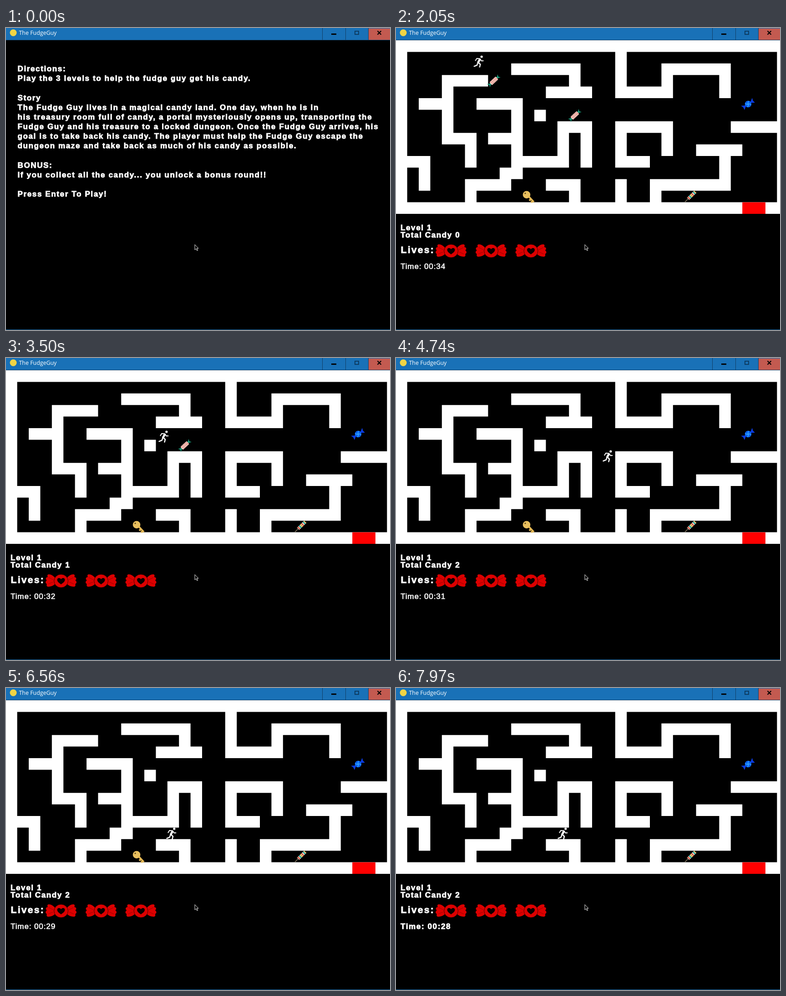
An HTML page for the animation above (8000 ms loop, 844 px wide and 663 px high).

```html
<!DOCTYPE html>
<html lang="en">
<head>
<meta charset="utf-8">
<title>The FudgeGuy</title>
<style>
html, body { margin: 0; width: 100%; height: 100%; overflow: hidden; background: #000; }
svg { display: block; width: 844px; height: 663px; }
text { fill: #fff; white-space: pre; }
.bold { font: bold 17px "Liberation Sans", Arial, sans-serif; letter-spacing: 1.63px; stroke: #fff; stroke-width: .9px; }
.big { font-size: 21px; letter-spacing: 2.3px; }
.thin { font: 17px "Liberation Sans", Arial, sans-serif; letter-spacing: .9px; stroke: #fff; stroke-width: .65px; }
.title { font: 12.4px "Open Sans", "Noto Sans", sans-serif; }

.tick, .intro, .sweet1, .sweet2, .key, .n0, .n1, .n2 { animation: 8s step-end infinite; }
.tick { animation-name: tick; animation-delay: calc(var(--i) * 1s - 7650ms); }
.intro { animation-name: intro; }
.sweet1, .n0 { animation-name: first; }
.sweet2 { animation-name: second; }
.n1 { animation-name: one; }
.n2 { animation-name: two; }
.key { animation-name: key; }
@keyframes tick { 0% { visibility: visible } 12.5%, 100% { visibility: hidden } }
@keyframes intro { 0% { visibility: visible } 6.25%, 100% { visibility: hidden } }
@keyframes first { 0% { visibility: visible } 28.875%, 100% { visibility: hidden } }
@keyframes second { 0% { visibility: visible } 45.625%, 100% { visibility: hidden } }
@keyframes one { 0%, 45.625%, 100% { visibility: hidden } 28.875% { visibility: visible } }
@keyframes two { 0% { visibility: hidden } 45.625%, 100% { visibility: visible } }
@keyframes key { 0% { visibility: visible } 89.375%, 100% { visibility: hidden } }

.runner { animation: run 8s linear infinite; }
@keyframes run {
  0% { transform: translate(34px, 60px) }
  12.875% { transform: translate(34px, 60px); animation-timing-function: steps(8) }
  15.875% { transform: translate(67px, 60px); animation-timing-function: steps(19) }
  23% { transform: translate(140px, 60px); animation-timing-function: steps(12) }
  27.5% { transform: translate(192px, 60px); animation-timing-function: steps(15) }
  33.25% { transform: translate(260px, 124px); animation-timing-function: steps(1) }
  33.625% { transform: translate(261px, 128px) }
  35.125% { transform: translate(261px, 128px); animation-timing-function: steps(5) }
  37% { transform: translate(282px, 128px); animation-timing-function: steps(7) }
  39.625% { transform: translate(303px, 154px); animation-timing-function: steps(7) }
  42.25% { transform: translate(331px, 155px) }
  43.25% { transform: translate(331px, 155px); animation-timing-function: steps(1) }
  43.625% { transform: translate(335px, 159px); animation-timing-function: steps(5) }
  45.5% { transform: translate(356px, 178px); animation-timing-function: steps(20) }
  53% { transform: translate(440px, 179px) }
  56.75% { transform: translate(440px, 179px); animation-timing-function: steps(6) }
  59% { transform: translate(454px, 202px); animation-timing-function: steps(2) }
  59.75% { transform: translate(456px, 207px); animation-timing-function: steps(14) }
  65.125% { transform: translate(456px, 264px); animation-timing-function: steps(5) }
  67% { transform: translate(433px, 285px); animation-timing-function: steps(6) }
  69.25% { transform: translate(433px, 310px); animation-timing-function: steps(11) }
  73.375% { transform: translate(382px, 310px); animation-timing-function: steps(3) }
  74.5% { transform: translate(382px, 297px) }
  78% { transform: translate(382px, 297px); animation-timing-function: steps(3) }
  79.125% { transform: translate(382px, 306px); animation-timing-function: steps(7) }
  81.75% { transform: translate(352px, 306px); animation-timing-function: steps(13) }
  86.625% { transform: translate(298px, 306px); animation-timing-function: steps(5) }
  88.375% { transform: translate(290px, 324px); animation-timing-function: steps(3) }
  89.5% { transform: translate(290px, 336px) }
  91.75% { transform: translate(290px, 336px); animation-timing-function: steps(7) }
  94.375% { transform: translate(303px, 306px); animation-timing-function: steps(11) }
  98.5% { transform: translate(343px, 306px); animation-timing-function: steps(3) }
  99.5%, 100% { transform: translate(355px, 306px) }
}
</style>
</head>
<body>
<svg viewBox="0 0 844 663">
  <defs>
    <g id="sweet">
      <path d="M-7 0L-16 -4.5L-13.500 0L-16 4.5ZM7 0L16 -4.5L13.500 0L16 4.5Z" fill="#169c7b"/>
      <rect x="-9.5" y="-4.4" width="19" height="8.8" rx="2" fill="#f6d5cb"/>
      <path d="M-8 -4L-5 4M-4.500 -4L-1.500 4M-1 -4L2 4M2.500 -4L5.500 4M6 -4L8.500 3" stroke="#d9746c" stroke-width="1.2"/>
    </g>
    <g id="life">
      <g id="wing" fill="#dc0000">
        <path d="M-9 -3C-15 -8 -20 -15 -28 -14C-31 -13 -30 -9 -29 -8C-34 -8 -35 -3 -31 -1C-35 1 -35 6 -31 7C-33 10 -31 14 -27 13C-20 13 -15 9 -9 4Z"/>
        <path d="M-27 -7L-17 -2M-28 7L-18 3" fill="none" stroke="#8a0000" stroke-width=".8"/>
      </g>
      <use href="#wing" transform="scale(-1 1)"/>
      <ellipse cy="0.5" rx="15.500" ry="14.5" fill="#dc0000" stroke="#200" stroke-width=".8"/>
      <path d="M0 8C-4 5 -8.500 2 -8.500 -2C-8.500 -7 -2 -7.500 0 -3C2 -7.500 8.500 -7 8.500 -2C8.500 2 4 5 0 8Z" fill="#0a0000"/>
    </g>
  </defs>

  <rect width="844" height="663"/>

  <g transform="translate(11.9 39.7) scale(25.4)">
    <path fill="none" stroke="#fff" stroke-linecap="square" d="M0 0H33V14H0Z
      M19 0V4H23V2H28V4 M10 2H15V4 M13 4H16 M7 3H4V8H6V10 M2 5H4
      M7 5H10V11H9V12H6V13 M8 8H10 M10 10H14V7H16V10 M12 6h.001
      M23 9V7H19V10H21 M29 7H33 M26 9H29 M28 9V12H22V13
      M0 10H2V12 M13 12H15V13 M19 12V13"/>
    <rect x="29.5" y="13.5" width="2" height="1" fill="#f00"/>
  </g>

  <use class="sweet1" href="#sweet" transform="translate(215 116) rotate(-43)"/>
  <use class="sweet2" href="#sweet" transform="translate(393 192) rotate(-43)"/>

  <g transform="translate(774 167) rotate(-35)">
    <path d="M-5 0L-15 -6L-13 0L-14 6ZM5 0L15 -6L13 0L14 6Z" fill="#0b3ce0"/>
    <circle r="7.3" fill="#0a5cf0"/>
    <path d="M0 0Q1 -4 5 -4M0 0Q4 1 4 5M0 0Q-1 4 -5 4M0 0Q-4 -1 -4 -5" fill="none" stroke="#35b6ff" stroke-width="1.5"/>
  </g>

  <g transform="translate(635 382) rotate(-44.5)" fill="none">
    <path d="M0 0H12" stroke="#8d8068" stroke-width="1.5"/>
    <path d="M10 0H32" stroke="#efe6cf" stroke-width="7"/>
    <path d="M11 0h2.500m9 0h2.500" stroke="#d8483d" stroke-width="7"/>
    <path d="M15 0h3m9 0h2.500" stroke="#1c9d92" stroke-width="7"/>
    <path d="M19 0h2.500m9 0h1.500" stroke="#d9a83c" stroke-width="7"/>
  </g>

  <g class="key">
    <path d="M289 367L303 382M296 376l-3 3M300 380l-3 3" stroke="#e3b755" stroke-width="4" fill="none"/>
    <circle cx="287" cy="366" r="8.300" fill="#e8bf5e"/>
    <circle cx="284" cy="363" r="1.500" fill="#4a3510"/>
  </g>

  <g class="runner" fill="none" stroke="#fff" stroke-linecap="round" stroke-linejoin="round">
    <circle cx="17.800" cy="3" r="2.600" fill="#fff" stroke="none"/>
    <path d="M13.800 9L10.300 15.300" stroke-width="4.600"/>
    <path d="M13.800 7.500L7.300 6.800L4.300 11.500M15.200 9L17.700 12.300L21.300 12.100" stroke-width="2"/>
    <path d="M10.800 16L15 19.800L13.500 25.500M9.500 16L7.800 21.500L1.500 24.100" stroke-width="2.500"/>
  </g>

  <g class="bold">
    <text x="10" y="443.500">Level 1</text>
    <text x="10" y="459.500">Total Candy <tspan class="n0">0</tspan></text>
    <text x="10" y="459.500" class="n1"><tspan visibility="hidden">Total Candy </tspan>1</text>
    <text x="10" y="459.500" class="n2"><tspan visibility="hidden">Total Candy </tspan>2</text>
    <text x="10.500" y="494" class="big">Lives:</text>
  </g>
  <use href="#life" x="121" y="489"/>
  <use href="#life" x="209" y="489"/>
  <use href="#life" x="296.500" y="489"/>
  <g class="thin">
    <text x="10" y="528.500" class="tick" style="--i:0">Time: 00:35</text>
    <text x="10" y="528.500" class="tick" style="--i:1">Time: 00:34</text>
    <text x="10" y="528.500" class="tick" style="--i:2">Time: 00:33</text>
    <text x="10" y="528.500" class="tick" style="--i:3">Time: 00:32</text>
    <text x="10" y="528.500" class="tick" style="--i:4">Time: 00:31</text>
    <text x="10" y="528.500" class="tick" style="--i:5">Time: 00:30</text>
    <text x="10" y="528.500" class="tick" style="--i:6">Time: 00:29</text>
    <text x="10" y="528.500" class="tick bold" style="--i:7">Time: 00:28</text>
  </g>

  <g class="intro bold">
    <rect y="27" width="844" height="636" stroke="none"/>
    <text x="25.500" y="94.500">Directions:</text>
    <text x="25.500" y="116">Play the 3 levels to help the fudge guy get his candy.</text>
    <text x="25.500" y="158.500">Story</text>
    <text x="25.500" y="179.500">The Fudge Guy lives in a magical candy land. One day, when he is in</text>
    <text x="25.500" y="200.500">his treasury room full of candy, a portal mysteriously opens up, transporting the</text>
    <text x="25.500" y="222">Fudge Guy and his treasure to a locked dungeon. Once the Fudge Guy arrives, his</text>
    <text x="25.500" y="243">goal is to take back his candy. The player must help the Fudge Guy escape the</text>
    <text x="25.500" y="264">dungeon maze and take back as much of his candy as possible.</text>
    <text x="25.500" y="306.500">BONUS:</text>
    <text x="25.500" y="327.500">If you collect all the candy... you unlock a bonus round!!</text>
    <text x="25.500" y="370">Press Enter To Play!</text>
  </g>

  <path d="M415 475.500V487L417.800 484.500L419.800 488.800L421.500 488L419.600 483.800H423Z" stroke="#fff" stroke-width=".9"/>

  <g shape-rendering="crispEdges">
    <rect width="844" height="27" fill="#1971b7"/>
    <rect x="796" y="1" width="48" height="25" fill="#c35a50"/>
    <path d="M695.500 0V26M746.500 0V26M796.500 0V26M0 26.500H844" stroke="#123f66" fill="none"/>
    <rect y="662" width="844" height="1" fill="#1971b7"/>
    <rect x="715" y="12" width="11" height="3"/>
    <rect x="767" y="7" width="8" height="7" fill="none" stroke="#0d3c62" stroke-width="2"/>
  </g>
  <path d="M816.500 6.500L824.500 14.500M824.500 6.500L816.500 14.500" stroke="#000" stroke-width="2.200"/>
  <circle cx="16" cy="10.500" r="7.500" fill="#f2d544"/>
  <text x="28.500" y="15.300" class="title">The FudgeGuy</text>
</svg>
</body>
</html>
```
